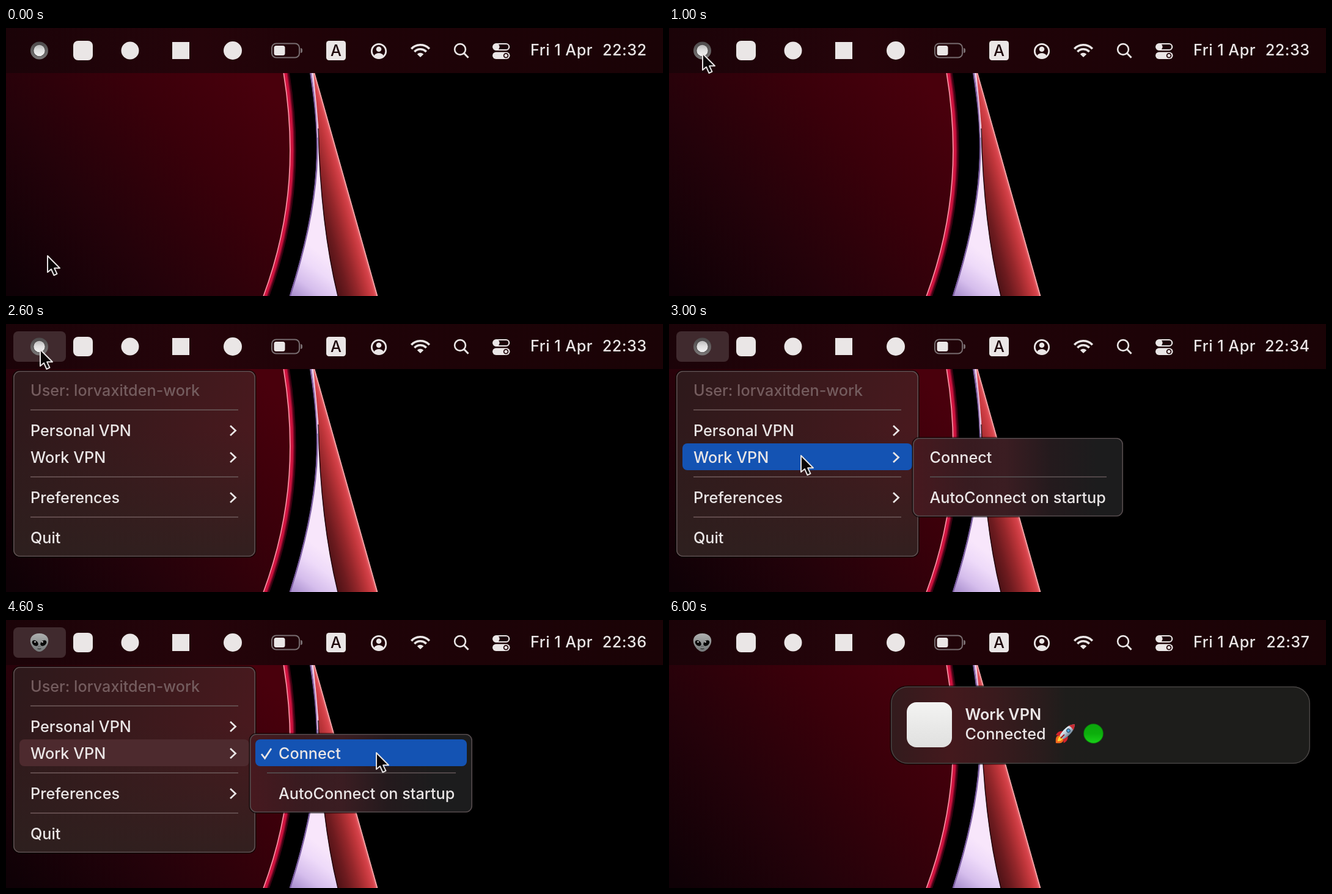
Recreate the animation shown at these times as an HTML page with a canvas. Size 1075 by 440 pixels, loop 7 s.

```html
<!DOCTYPE html>
<html lang="en">
<head>
<meta charset="utf-8">
<title>Menu bar VPN</title>
<style>
html, body { margin: 0; width: 100%; height: 100%; overflow: hidden; background: #000; }
canvas { display: block; width: 1075px; height: 440px; }
</style>
</head>
<body>
<canvas id="stage" width="1075" height="440"></canvas>
<script>
const W = 1075, H = 440, STEP = 1000;
const ctx = document.getElementById('stage').getContext('2d');
const FONT = 'Inter, Roboto, sans-serif';
const INK = '#eae6e6';

// One entry per second of the loop.
const scenes = [
  { time: '22:32', cursor: [68, 374] },
  { time: '22:33', cursor: [55, 42] },
  { time: '22:33', cursor: [56, 42], menu: true },
  { time: '22:34', cursor: [216, 216], menu: true, row: '#1453b3', sub: 344 },
  { time: '22:36', cursor: [606, 218], menu: true, row: '#4d2a2e', sub: 364, on: true },
  { time: '22:37', note: 'Connecting', on: true },
  { time: '22:37', note: 'Connected', on: true }
];

function shade(x0, y0, x1, y1, ...stops) {
  const g = ctx.createLinearGradient(x0, y0, x1, y1);
  stops.forEach(([at, color]) => g.addColorStop(at, color));
  return g;
}

function box(x, y, w, h, r, fill) {
  ctx.beginPath();
  ctx.roundRect(x, y, w, h, r);
  ctx.fillStyle = fill;
  ctx.fill();
}

function frame(x, y, w, h, r, color, width) {
  ctx.beginPath();
  ctx.roundRect(x, y, w, h, r);
  ctx.strokeStyle = color;
  ctx.lineWidth = width;
  ctx.stroke();
}

function oval(x, y, rx, ry, fill, turn = 0) {
  ctx.beginPath();
  ctx.ellipse(x, y, rx, ry, turn, 0, Math.PI * 2);
  ctx.fillStyle = fill;
  ctx.fill();
}

const dot = (x, y, r, fill) => oval(x, y, r, r, fill);

function ring(x, y, r, width, color = INK) {
  ctx.beginPath();
  ctx.arc(x, y, r, 0, Math.PI * 2);
  ctx.lineWidth = width;
  ctx.strokeStyle = color;
  ctx.stroke();
}

function line(points, width, color = INK) {
  ctx.beginPath();
  points.forEach(([x, y]) => ctx.lineTo(x, y));
  ctx.lineWidth = width;
  ctx.strokeStyle = color;
  ctx.stroke();
}

function shape(d, fill) {
  ctx.fillStyle = fill;
  ctx.fill(new Path2D(d));
}

function curve(d, dx, width, color) {
  ctx.save();
  ctx.translate(dx, 0);
  ctx.lineWidth = width;
  ctx.strokeStyle = color;
  ctx.stroke(new Path2D(d));
  ctx.restore();
}

function text(s, x, y, { color = INK, weight = 500, size = 25.2, align = 'left', gap = 0 } = {}) {
  ctx.font = `${weight} ${size}px ${FONT}`;
  ctx.letterSpacing = `${gap}px`;
  ctx.textAlign = align;
  ctx.fillStyle = color;
  ctx.fillText(s, x, y);
}

function wallpaper() {
  ctx.fillStyle = '#000';
  ctx.fillRect(0, 0, W, H);

  const rim = 'M454 74C472 185 471 305 421 440';
  curve(rim, 6.5, 7, '#3c0212');
  curve(rim, 4.5, 5.5, '#8a0a2b');
  shape(rim + 'H0V74Z', shade(20, 440, 420, 90,
    [0, '#0f0106'], [.35, '#24020a'], [.7, '#3a000a'], [1, '#49000c']));
  curve(rim, 3, 4.6, '#d0133f');
  curve(rim, .3, 1.8, '#f98da2');

  // Red blade, shaded by distance from its straight edge.
  shape('M499 74H505L608 440H542C520 350 512 250 510 150Z',
    shade(493.4, 268.6, 555, 251.3, [0, '#4a1115'], [.3, '#6e1b1f'],
      [.55, '#96272b'], [.78, '#c0363b'], [.92, '#d7434b'], [1, '#ea7077']));
  line([[504.5, 74], [607.5, 440]], 1.8, '#f3a3a6');

  const fold = 'M497.5 74C514 180 518 270 464 440';
  shape(fold + 'H543C521 350 513 260 511 160C508 120 505 95 503 74Z',
    shade(464, 440, 515, 370, [0, '#a58acb'], [.35, '#d5bdec'], [.7, '#eedaf9'], [1, '#f8e6fb']));
  curve('M511 165C513 255 521 350 543 440', 0, 1.4, '#1e060c');
  curve(fold, .8, 2.4, '#7a5ca0');
  curve('M500.5 74C505.5 105 508.5 140 510 180', 0, 1.6, '#d9b3d8');
}

function alien(x, y) {
  shape(`M${x} ${y - 15}C${x + 11} ${y - 15} ${x + 16} ${y - 8} ${x + 14.5} ${y}` +
    `C${x + 13} ${y + 7} ${x + 6} ${y + 15} ${x} ${y + 15}` +
    `C${x - 6} ${y + 15} ${x - 13} ${y + 7} ${x - 14.5} ${y}` +
    `C${x - 16} ${y - 8} ${x - 11} ${y - 15} ${x} ${y - 15}Z`,
    shade(x, y - 15, x, y + 15, [0, '#aeb0b0'], [.45, '#939696'], [1, '#747879']));
  for (const side of [-1, 1]) {
    oval(x + side * 6.8, y + 1, 5.6, 4, '#090909', -side * .65);
    oval(x + side * 6 - 1, y - 1, 1.6, 1, '#dedede');
    dot(x + side * 1.2, y + 6.2, .6, '#333');
  }
  line([[x - 3, y + 10], [x, y + 10.7], [x + 3, y + 10]], 1.2, '#2b2b2b');
}

function button(x, y) {
  dot(x, y, 14.5, shade(x, y - 14, x, y + 14, [0, '#4d4a4b'], [1, '#7a7777']));
  dot(x, y, 10, '#474546');
  dot(x, y, 9.2, shade(x, y - 9, x, y + 9, [0, '#bcbcbc'], [.45, '#dedede'], [1, '#f2f2f2']));
}

function menuBar({ time, on, menu }) {
  ctx.fillStyle = shade(0, 0, W, 0,
    [0, '#1b0308'], [.3, '#25040a'], [.45, '#200308'], [1, '#1a0306']);
  ctx.fillRect(0, 0, W, 74);
  if (menu) box(12, 12, 86, 50, 8, '#402a2e');
  (on ? alien : button)(54.5, 37);

  // App icons
  box(110, 21, 32, 32, 8, INK);
  dot(203, 37, 14.5, INK);
  box(272, 23, 28, 28, 0, INK);
  dot(371, 37, 15, INK);

  frame(435, 25.5, 45, 23, 7, '#786d70', 2);
  box(438.5, 29, 18, 16, 3.5, INK);
  box(482, 33, 3, 8, [0, 3, 3, 0], '#786d70');

  box(524, 21, 32, 32, 4.5, INK);
  text('A', 540, 46, { color: '#1c0509', align: 'center' });

  ring(610, 38, 11.7, 2.7);
  dot(610, 34.8, 4.3, INK);
  shape('M602.3 46C604 39.8 616 39.8 617.7 46C614 50 606 50 602.3 46Z', INK);

  for (const [r, width] of [[20.2, 3.6], [13.2, 3.6], [3.6, 7.2]]) {
    ctx.beginPath();
    ctx.arc(678, 48, r, -Math.PI * .76, -Math.PI * .24);
    ctx.lineWidth = width;
    ctx.strokeStyle = INK;
    ctx.stroke();
  }

  ring(743, 35, 8.9, 2.6);
  line([[749.5, 41.5], [756.5, 48.8]], 3);

  frame(797.2, 26, 26, 10, 5, INK, 2.2);
  dot(802, 31, 5.6, INK);
  box(796, 39.5, 28.5, 11.5, 6, INK);
  ring(818, 45.2, 3.4, 1.8, '#200408');

  text('Fri 1 Apr', 858, 45, { gap: .5 });
  text(time, 1048.5, 45, { align: 'right', gap: .5 });
}

function panel(x, y, w, h, r, fill, edge) {
  frame(x - .5, y - .5, w + 1, h + 1, r, 'rgba(0,0,0,.6)', 2);
  box(x, y, w, h, r, fill);
  frame(x + .8, y + .8, w - 1.6, h - 1.6, r - .8, edge, 1.6);
}

const rule = (x0, x1, y, color = '#614b4c') => line([[x0, y], [x1, y]], 2, color);

function mainMenu(row) {
  panel(12, 77, 396, 305, 11, shade(12, 80, 400, 200,
    [0, '#2d191b'], [.5, '#3a191c'], [1, '#49191e']), 'transparent');
  box(12, 77, 396, 305, 11, shade(0, 170, 0, 382,
    [0, 'rgba(44,33,31,0)'], [1, 'rgba(44,33,31,.8)']));
  frame(12.8, 77.8, 394.4, 303.4, 10, '#5d4f50', 1.6);
  if (row) box(22, 196, 376, 44, 8, row);

  text('User: lorvaxitden-work', 40, 118, { color: '#745c5e' });
  [141, 251, 317].forEach(y => rule(40, 380, y));
  [['Personal VPN', 175], ['Work VPN', 219], ['Preferences', 285]].forEach(([label, y]) => {
    text(label, 40, y + 9);
    line([[367, y - 8], [375.5, y], [367, y + 8]], 2.8);
  });
  text('Quit', 40, 360);
}

function subMenu(w, on) {
  const x = on ? 446 : 426.5;
  panel(399, 187, w, 129, 11, shade(399, 0, 700, 0,
    [0, '#47191f'], [.3, '#381b20'], [.5, '#3b1d22'], [.75, '#241a1d'], [1, '#1c1c1d']), '#554b4d');
  if (on) {
    box(408, 196, w - 18, 44, 8, '#1453b3');
    line([[418, 220], [423.5, 227], [434, 211]], 2.8);
  }
  rule(427, 372 + w, 251, '#514749');
  text('Connect', x, 228);
  text('AutoConnect on startup', x, 294);
}

function paw(x, y, turn) {
  ctx.save();
  ctx.translate(x, y);
  ctx.rotate(turn);
  const c = '#4d4748';
  oval(0, 3.5, 5.6, 4.6, c);
  oval(-6.5, -1.5, 2, 3, c, -.5);
  oval(-2.5, -5.5, 2, 3.1, c, -.1);
  oval(2.5, -5.5, 2, 3.1, c, .1);
  oval(6.5, -1.5, 2, 3, c, .5);
  ctx.restore();
}

function rocket(x, y) {
  ctx.save();
  ctx.translate(x, y);
  ctx.rotate(Math.PI / 4);
  shape('M-4 8C-9 13 -6 17 0 22C6 17 9 13 4 8Z', '#f4681c');
  shape('M-2.5 8C-4.5 13 -2 15 0 18C2 15 4.5 13 2.5 8Z', '#ffd53a');
  shape('M-4 -1C-11 3 -11 9 -9 13L-3 8H3L9 13C11 9 11 3 4 -1Z', '#d3222b');
  shape('M0 -22C8 -13 7 0 4 9H-4C-7 0 -8 -13 0 -22Z',
    shade(-7, 0, 7, 0, [0, '#f0f6fa'], [.45, '#b9cbd9'], [1, '#667d91']));
  shape('M0 -22C3 -18.5 4.6 -15.5 5.3 -13Q0 -15 -5.3 -13C-4.6 -15.5 -3 -18.5 0 -22Z', '#c92b33');
  dot(0, -7, 3.4, '#37536c');
  dot(0, -7, 2.2, '#4aa6dd');
  box(-1, 2, 2, 9, 1, '#a4161f');
  ctx.restore();
}

function notice(status) {
  panel(363, 109, 686, 127, 28, shade(363, 0, 700, 0,
    [0, '#321b1d'], [.28, '#44191d'], [.5, '#3a1a1d'], [.75, '#281c1c'], [.85, '#1e1d1b'], [1, '#1d1d1b']), '#454241');
  box(389, 135, 74, 74, 16, shade(0, 135, 0, 209, [0, '#f3f3f2'], [1, '#e0e0df']));
  text('Work VPN', 484.5, 164, { weight: 600 });
  text(status, 484.5, 196);
  if (status === 'Connecting') {
    paw(649, 179, -.35);
    paw(664, 193, -.35);
    rocket(701.5, 186.5);
  } else {
    rocket(648.5, 186.5);
    dot(694.5, 186.5, 16.3, '#0b7d0b');
    dot(694.5, 186.5, 15.3, shade(0, 171, 0, 202, [0, '#0ba60c'], [.5, '#0cae0c'], [1, '#19d018']));
  }
}

function pointer([x, y]) {
  const p = new Path2D(`M${x} ${y}v27l6 -5l4.5 10l5 -2.3l-4.4 -9.4h8.9Z`);
  ctx.lineJoin = 'round';
  ctx.lineWidth = 2;
  ctx.fillStyle = '#0a0506';
  ctx.strokeStyle = '#e6e3e3';
  ctx.fill(p);
  ctx.stroke(p);
  ctx.lineJoin = 'miter';
}

function draw(now) {
  const s = scenes[Math.floor(now / STEP) % scenes.length];
  wallpaper();
  menuBar(s);
  if (s.menu) mainMenu(s.row);
  if (s.sub) subMenu(s.sub, s.on);
  if (s.note) notice(s.note);
  if (s.cursor) pointer(s.cursor);
}

const start = performance.now();
function tick() {
  draw(performance.now() - start);
  requestAnimationFrame(tick);
}
tick();
</script>
</body>
</html>
```
